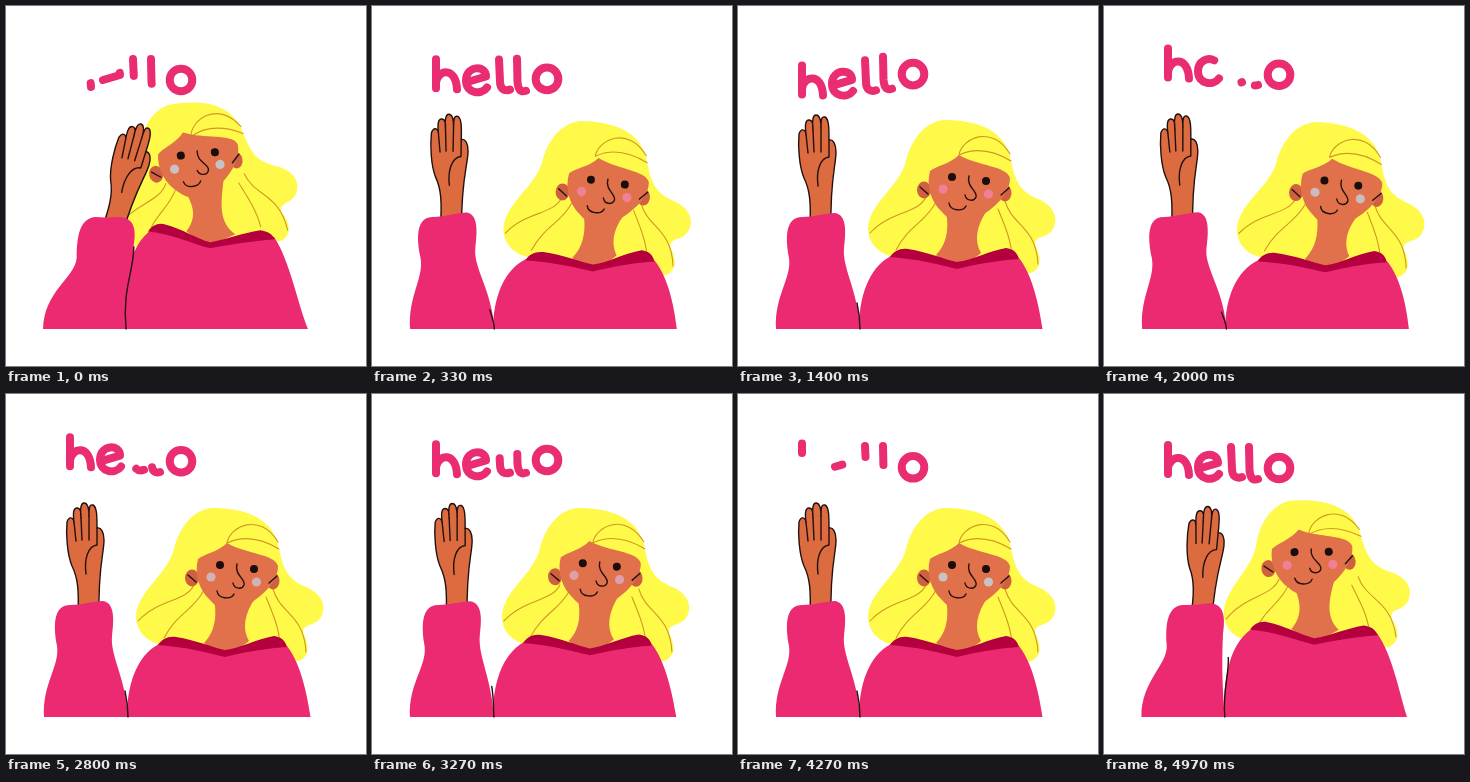
These frames come from a looping animation (360x360 px, 5 s). An HTML page:

```html
<!DOCTYPE html>
<html lang="en">
<head>
<meta charset="utf-8">
<title>Hello wave</title>
<style>
  html, body { margin: 0; width: 100%; height: 100%; overflow: hidden; background: #fff; }
  svg { display: block; width: 100vw; height: 100vh; }
  .hair { fill: #fff94a; }
  .skin { fill: #e0714a; }
  .ear { fill: #cf6040; }
  .pink { fill: #ec2a72; }
  .collar { fill: #b50040; }
  .ink, .strand { fill: none; stroke: #24100f; stroke-width: 1.4; stroke-linecap: round; stroke-linejoin: round; }
  .strand { stroke: #cf9a20; stroke-width: 1.1; }
  .letter { fill: none; stroke: #ea2c73; stroke-width: 8; stroke-linecap: round; stroke-linejoin: round; }
</style>
</head>
<body>
<svg viewBox="0 0 360 360" role="img" aria-label="hello">
  <g id="hair">
    <path class="hair" d="M205 114C185 117 173 135 168 155C162 180 132 196 130 222C130 239 143 250 160 251L175 262L262 262L278 262C284 267 290 269 295 266C304 261 303 250 297 239C297 228 308 234 315 223C321 212 316 200 300 193C281 185 277 175 272 150C265 124 240 114 205 114Z"/>
    <path class="strand" d="M221 149C224 132 254 118 272 148M221 149C240 140 258 146 273 155M188 191C180 208 152 205 132 227M198 196C188 216 172 218 158 244M267 195C274 220 298 220 300 258M260 203C267 220 273 234 274 250"/>
  </g>
  <path id="neck" class="skin"/>
  <g id="face">
    <ellipse class="ear" cx="186" cy="184" rx="7" ry="8.5"/>
    <ellipse class="ear" cx="267" cy="187" rx="6.5" ry="8.5"/>
    <path class="skin" d="M221 149C212 158 198 160 192 165C188 180 193 196 204 206C214 219 236 219 246 208C260 199 272 186 272 172C269 160 240 160 221 149Z"/>
    <path class="ink" d="M182 181L190 188M271 182L263 189"/>
    <circle cx="214" cy="171" r="4" fill="#1c0d0d"/>
    <circle cx="248" cy="175" r="4" fill="#1c0d0d"/>
    <g id="blush">
      <circle cx="205" cy="183" r="4.6"/>
      <circle cx="250.5" cy="188" r="4.6"/>
    </g>
    <path class="ink" d="M231 170C228 181 240 185 238 191C236 196 228 195 227 189M211 197C212 205 225 206 228 200"/>
  </g>
  <path id="body" class="pink"/>
  <path id="collar" class="collar"/>
  <g id="hand">
    <path class="ink" style="fill:#dc6c40" d="M72 222C73 197 72 184 66 172C61 160 60 140 61 128C63 122 67 123 68 128C67 120 67 114 71 114C75 114 75 119 75 124C74 114 75 109 78 109C82 109 83 114 83 122C83 115 83 110 87 111C91 113 91 122 91 134C95 133 98 138 98 146C98 160 92 172 93 222"/>
    <path class="ink" d="M68 128L70 147M75 124L76 146M83 122L83 146M91 134L91 151C82 152 78 165 80 180"/>
  </g>
  <path id="sleeve" class="pink"/>
  <path id="seam" class="ink"/>
  <g class="letter">
    <path id="h" pathLength="1" d="M64 51L64 80L64 74C66 61 84 58 85 81"/>
    <path id="e" pathLength="1" d="M115 80C109 88 94 86 94 73C94 58 114 57 114 69L97 74"/>
    <path id="l1" pathLength="1" d="M138 83C132 85 128 82 128 75L127 53"/>
    <path id="l2" pathLength="1" d="M154 85C148 87 146 83 145.500 76L145 53"/>
    <circle id="o" cx="175" cy="74" r="11.3"/>
  </g>
</svg>
<script>
const LOOP = 5000, SWAY = LOOP / 3, WORD = LOOP / 13;
const LEAD = 130;      // ms from the start of a wave to the start of the loop
const HAIR_LAG = 20;
const WIPE = 60, WIPE_LEAD = 35;

const $ = id => document.getElementById(id);
const set = (id, attrs) => {
  for (const k in attrs) $(id).setAttribute(k, attrs[k]);
};
const ramp = (t, a, b) => Math.min(1, Math.max(0, (t - a) / (b - a)));
const ease = x => (1 - Math.cos(Math.PI * x)) / 2;
const mix = (a, b, f) => a + (b - a) * f;

// Eases through [time, value] points and starts from rest.
const glide = (points, t) => points.slice(1).reduce(
  (v, [end, to], i) => mix(v, to, ease(ramp(t, points[i][0], end))), points[0][1]);

const lean = t => glide([[10, 0], [165, 1.12], [510, -.22], [690, 0]], t);
const tilt = t => glide([[60, 0], [140, 18], [350, 18], [470, 0]], t);

// Upright pose, then leaning pose.
const shapes = {
  neck: [
    "M206 196C211 215 212 235 198 249C205 256 212 257 219 257C228 257 236 253 243 247C236 235 238 220 250 203Z",
    "M172 176C184 192 194 208 180 225C188 231 196 236 204 236C212 236 220 232 229 228C213 216 214 200 217 174Z"],
  body: [
    "M121 323C121 292 130 262 153 250C175 250 198 258 218 260C240 258 262 252 281 252C295 270 301 300 304.5 323Z",
    "M120 323C118 290 118 246 143 225C163 226 184 236 203 239C226 236 248 230 268 231C284 255 292 300 302 323Z"],
  collar: [
    "M152 251C156 245 162 242 170 243C190 246 205 253 219 256C235 254 250 245 268 242C275 243 279 246 281 253C255 255 235 259 219 263C203 259 180 253 152 251Z",
    "M142 225C146 219 152 216 159 218C175 222 190 232 204 236C220 233 236 227 254 224C262 225 266 228 269 233C245 235 225 238 204 242C188 238 165 227 142 225Z"],
  sleeve: [
    "M38 323C36 290 54 272 51 252C46 226 50 211 64 211C76 211 88 207 97 207C109 209 108 226 106 242C104 262 120 285 122 323Z",
    "M37 323C38 285 69 272 71 252C71 226 76 212 90 211C100 212 108 211 115 211C128 213 131 222 128 240C128 264 116 283 120 323Z"],
  seam: [
    "M119 297C121 306 122 315 122 323",
    "M128 240C128 264 116 283 120 323"]
};

// Blends two paths of the same structure.
function blend([from, to], f) {
  const ends = to.match(/[\d.]+/g);
  let i = 0;
  return from.replace(/[\d.]+/g, n => mix(+n, +ends[i++], f).toFixed(2));
}

const headPose = p =>
  `translate(${-37 * p} ${-25 * p}) rotate(${-12.4 * p} 227.5 185.5)`;

function drawFigure(t) {
  const p = lean(t);
  for (const id in shapes) set(id, { d: blend(shapes[id], p) });
  set("face", { transform: headPose(p) });
  set("hair", { transform: headPose(lean(t - HAIR_LAG)) });
  set("hand", { transform: `translate(${27 * p} ${6 * p}) rotate(${tilt(t)} 83 210)` });
}

// Early letters bob up and down, later ones mostly hop.
function bob(t, place) {
  const x = ramp(t, 0, 335);
  return -8.5 * (1 - place) * Math.sin(2 * Math.PI * x) - 8 * place * Math.sin(Math.PI * x);
}

const letters = [
  { id: "h", begin: 0, span: 70 },
  { id: "e", begin: 30, span: 70 },
  { id: "l1", begin: 75, span: 150 },
  { id: "l2", begin: 65, span: 150 }
];

// Each letter is wiped off from its start in turn, then drawn again.
function drawWord(t) {
  const age = (t + WIPE_LEAD) % WORD;
  letters.forEach(({ id, begin, span }, i) => {
    const delay = 12 * i - 22;
    const wiped = ramp(age, delay, delay + WIPE);
    const from = wiped < 1 ? wiped : 0;
    const to = wiped < 1 ? 1 : ramp(t, begin, begin + span);
    set(id, {
      transform: `translate(0 ${bob(t, i / 4)})`,
      "stroke-dasharray": `${to - from} 2`,
      "stroke-dashoffset": -from,
      visibility: to - from < .01 ? "hidden" : "visible"
    });
  });
  set("o", { transform: `translate(0 ${bob(t, 1)})` });

  const glow = ramp(t, 60, 250) - ramp(t, 348, WORD);
  const [r, g, b] = [mix(200, 240, glow), mix(194, 128, glow), mix(196, 150, glow)].map(Math.round);
  set("blush", { fill: `rgb(${r},${g},${b})` });
}

// 25 poses a second, shown on a 30 Hz grid.
function tick() {
  const slot = Math.floor((performance.now() % LOOP + 4) * .03);
  const t = Math.floor(slot * 5 / 6 + 1e-6) * 40 % LOOP;
  drawFigure((t + LEAD) % SWAY);
  drawWord(t % WORD);
  requestAnimationFrame(tick);
}
tick();
</script>
</body>
</html>
```
